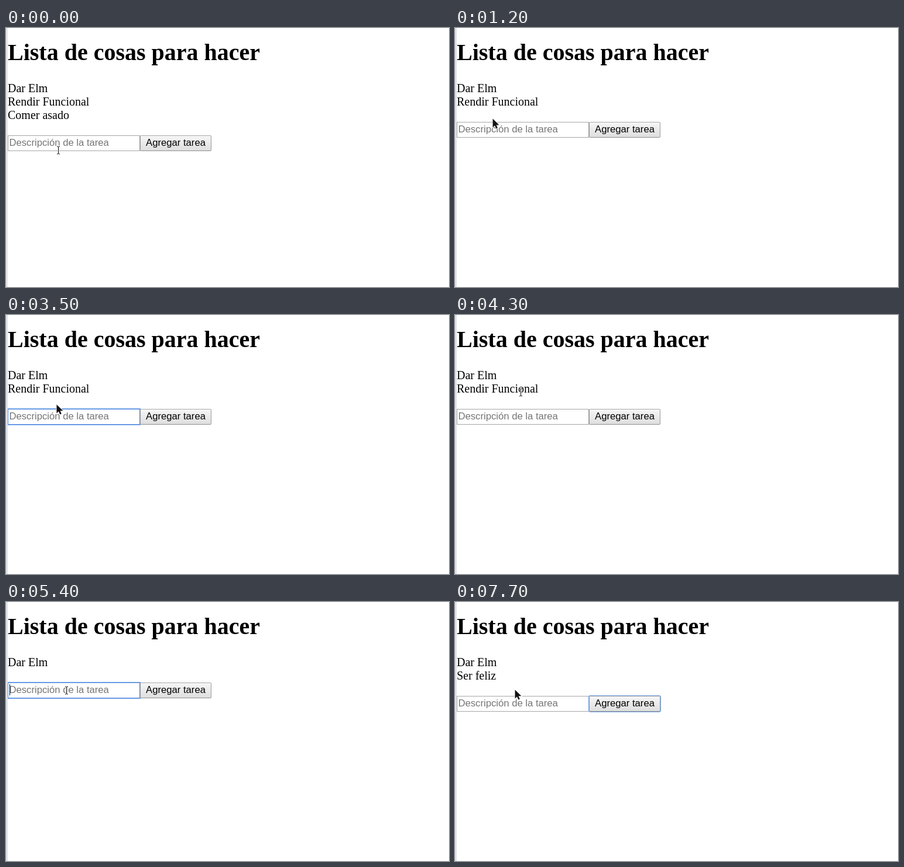
An HTML page for the animation above (8000 ms loop, 757 px wide and 444 px high).

```html
<!DOCTYPE html>
<html lang="es">
<head>
<meta charset="utf-8">
<title>Lista de cosas para hacer</title>
<style>
html, body { margin: 0; width: 100%; height: 100%; overflow: hidden; background: #fff; }
body { position: relative; color: #000; font: 20px/23px "Liberation Serif", "Times New Roman", serif; }
h1, #list, #form, #edge, #cursor { position: absolute; margin: 0; }
h1 { left: 3px; top: 19px; font-size: 40px; line-height: 46px; white-space: nowrap; }
#list { left: 3px; top: 92px; }
#list div { width: fit-content; height: 23px; white-space: nowrap; }
#form { left: 3px; font: 16.667px/19px "Liberation Sans", Arial, sans-serif; white-space: pre; }
#form > div { position: absolute; top: 0; height: 27px; box-sizing: border-box; border: 1px solid #a6a6a6; }
#field { left: 0; width: 226px; padding: 2px 0 0 1.5px; background: #fff; }
#button { left: 226px; width: 122px; padding-top: 2px; text-align: center; border-radius: 2px;
  background: linear-gradient(#f6f6f6, #dedede); }
#form #button { border-color: #a9a9a9 #999 #8e8e8e #999; }
#button.pressed { background: linear-gradient(#dcdcdc, #f2f2f2); }
#form > div.focus { border-color: #5b90e0; box-shadow: 0 0 0 1px #74a3ea; }
#hint { color: #757575; }
#caret { display: inline-block; width: 1px; height: 19px; margin-right: -1px; background: #000; vertical-align: top; }
#edge { left: 0; top: 0; width: 3px; height: 100%; }
#cursor { left: 0; top: 0; overflow: visible; pointer-events: none; }
</style>
</head>
<body>
<h1>Lista de cosas para hacer</h1>
<div id="list"></div>
<div id="form">
  <div id="field" class="text"><span id="typed"></span><span id="caret"></span><span id="hint">Descripción de la tarea</span></div>
  <div id="button">Agregar tarea</div>
</div>
<div id="edge"></div>
<svg id="cursor" width="1" height="1">
  <g id="beam" fill="none">
    <path id="bar" d="M-2-6.5H-1L0-5.5 1-6.5H2M0-5.5V5.5M-2 6.5H-1L0 5.5 1 6.5H2" stroke="#fff" stroke-width="3"/>
    <use href="#bar" style="stroke:#000"/>
    <path d="M-2.5-6.5H-1L0-5.5 1-6.5H2.5M0-5.5V5.5M-2.5 6.5H-1L0 5.5 1 6.5H2.5" stroke="#000"/>
  </g>
  <path id="arrow" d="M0 0V15l3.5-3.3 2.3 5.2 2.5-1.1-2.3-5.1h4.9z" fill="#111" stroke="#fff" stroke-width="1.6" paint-order="stroke"/>
</svg>
<script>
const $ = id => document.getElementById(id);
const TICK = 100, LOOP = 8000;

// Pointer path: time, x, y
const path = [
  [100, 89.5, 209.5], [700, 64, 155.5],
  [1500, 64, 155.5], [2300, 64.5, 170.5],
  [3300, 64.5, 170.5], [3700, 108.5, 136.5],
  [3900, 108.5, 136.5], [4300, 112.5, 132.5],
  [4500, 112.5, 132.5], [5300, 103.5, 151.5],
  [7600, 103.5, 151.5], [7700, 102, 150.5]
];
// Typed text from a given time on
const typing = [[5900, 1], [6100, 2], [6200, 3], [6300, 5], [6400, 6], [6500, 7], [6600, 8], [6700, 9], [7700, 0]];
const newTask = 'Ser feliz';

function pointerAt(t) {
  const i = path.findIndex(p => p[0] >= t);
  if (i <= 0) return (i ? path.at(-1) : path[0]).slice(1);
  const [a, b] = [path[i - 1], path[i]], k = (t - a[0]) / (b[0] - a[0]);
  return [1, 2].map(j => a[j] + (b[j] - a[j]) * k);
}

function tasksAt(t) {
  const tasks = ['Dar Elm'];
  if (t < 4400) tasks.push('Rendir Funcional');
  if (t < 1200) tasks.push('Comer asado');
  if (t >= 7700) tasks.push(newTask);
  return tasks;
}

const within = (t, from, to) => t >= from && t < to;
let shown = -1;

function draw(t) {
  const tasks = tasksAt(t);
  $('list').innerHTML = tasks.map(s => `<div class="text">${s}</div>`).join('');
  $('form').style.top = 115 + 23 * tasks.length + 'px';

  const count = typing.reduce((n, [from, len]) => t >= from ? len : n, 0);
  $('typed').textContent = newTask.slice(0, count);
  $('hint').hidden = count > 0;

  const focused = within(t, 2400, 4300) || within(t, 5400, 7300);
  const blinkOff = within(t, 3100, 3600) || within(t, 4200, 4300);
  $('field').className = focused ? 'text focus' : 'text';
  $('caret').style.opacity = focused && !blinkOff ? 1 : 0;
  $('button').className = (t >= 7300 ? 'focus ' : '') + (within(t, 7500, 7700) ? 'pressed' : '');
  $('edge').style.background = t < 1200 ? '#e7e7e7' : '#e1e3ea';

  const [x, y] = pointerAt(t);
  const under = document.elementFromPoint(x, y);
  const overText = under && under.closest('.text');
  $('cursor').style.transform = `translate(${Math.floor(x) + 0.5}px, ${Math.floor(y) + 0.5}px)`;
  $('beam').style.display = overText ? '' : 'none';
  $('arrow').style.display = overText ? 'none' : '';
}

const start = performance.now();
function loop() {
  const t = Math.floor((performance.now() - start) % LOOP / TICK) * TICK;
  if (t !== shown) draw(shown = t);
  requestAnimationFrame(loop);
}
loop();
</script>
</body>
</html>
```
